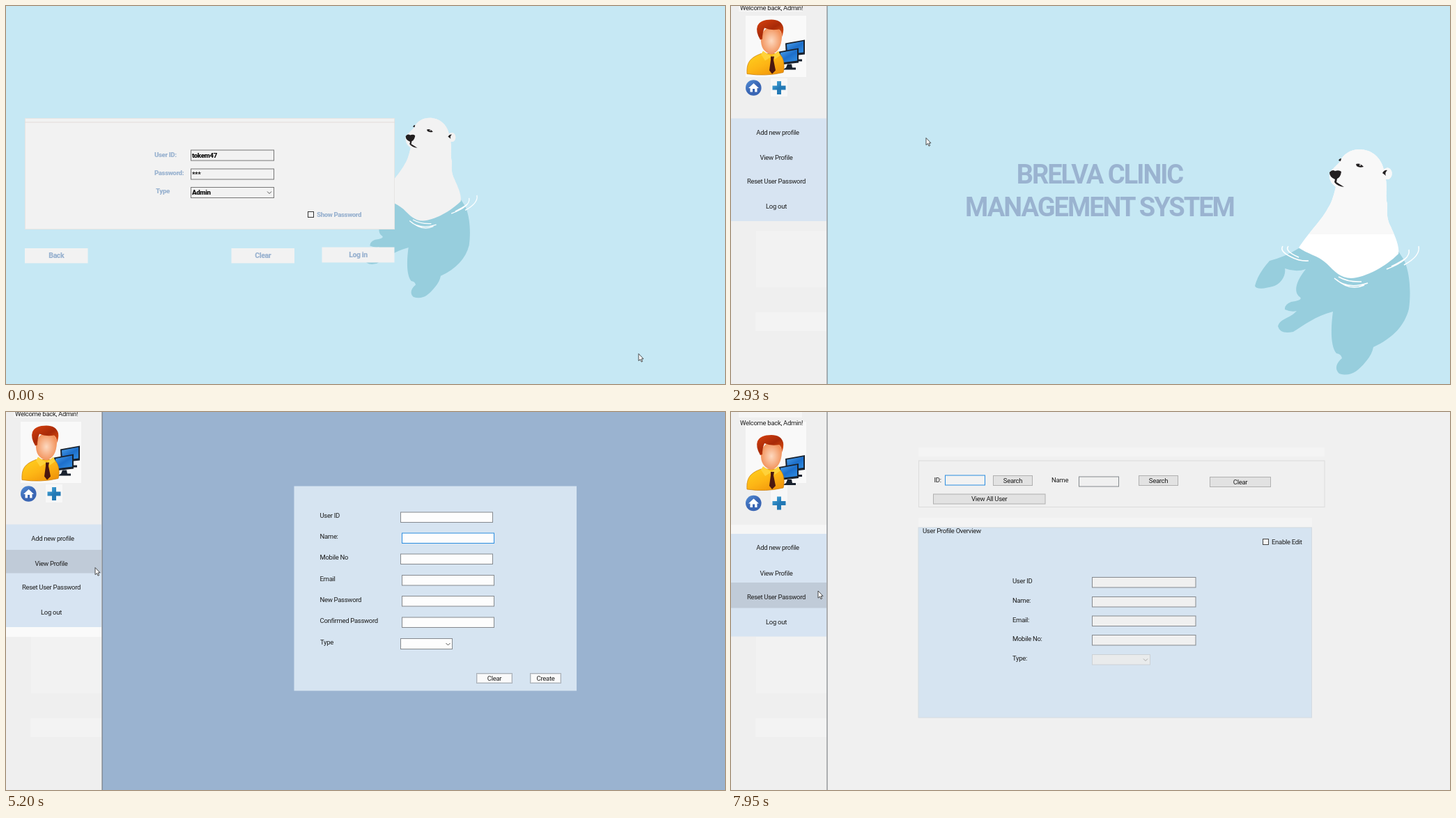
Recreate the animation shown at these times as an HTML page. Size 1032 by 543 pixels, loop 8 s.

```html
<!DOCTYPE html>
<html lang="en">
<head>
<meta charset="utf-8">
<title>Clinic login</title>
<style>
html, body { margin: 0; width: 100%; height: 100%; overflow: hidden; background: #c6e8f4; }
svg { display: block; width: 1032px; height: 543px; }
text { font-family: Roboto, "Open Sans", sans-serif; font-size: 9.5px; letter-spacing: -.3px; fill: #1c1c1c; white-space: pre; }
.b { font-weight: 900; font-size: 9.7px; letter-spacing: -.4px; fill: #9ab3d0; }
.k { fill: #111; }
.btn { font-size: 10.5px; }
.title { font-weight: 700; font-size: 38px; letter-spacing: -2px; fill: #9ab3d0; }
.mid { text-anchor: middle; }
</style>
</head>
<body>
<svg id="stage" viewBox="0 0 1032 543" xmlns="http://www.w3.org/2000/svg"></svg>
<script>
const LOOP = 8000, SHIFT = -13.5;
const BLUE = '#9ab3d0', PALE = '#d6e4f1', GREY = '#f0f0f0', SEA = '#97cedd', SKY = '#c6e8f4';

const rect = (x, y, w, h, fill) => `<rect x="${x}" y="${y}" width="${w}" height="${h}" fill="${fill}"/>`;
const box = (x, y, w, h, fill, line) =>
  `<rect x="${x + .5}" y="${y + .5}" width="${w - 1}" height="${h - 1}" fill="${fill}" stroke="${line}"/>`;
const text = (x, cy, s, cls = '') => `<text x="${x}" y="${cy + 3.4}" class="${cls}">${s}</text>`;
const path = (d, fill, extra = '') => `<path d="${d}" fill="${fill}" ${extra}/>`;
const group = (id, body, extra = '') => `<g id="${id}" ${extra}>${body}</g>`;
const chevron = (x, y, c = '#555') => path(`M${x - 3} ${y - 1.5}l3 3 3 -3`, 'none', `stroke="${c}"`);
const button = (x, y, w, h, label) =>
  box(x, y, w, h, '#e2e2e2', '#b0b0b0') + text(x + w / 2, y + h / 2, label, 'mid');
const framed = (x, y, w, h, label, fill = '#fafafa') =>
  box(x, y, w, h, fill, '#a9b0b8') + box(x + 1, y + 1, w - 2, h - 2, 'none', '#dcdfe2') +
  text(x + w / 2, y + h / 2, label, 'mid');

// Polar bear, split into underwater and dry parts
function bear(top, low) {
  const dry = 'M902 206C889 206 878 213 874 224L860 238Q857 246 862 254L868 260Q863 282 857 290C849 306 832 322 815 347' +
    'C826 356 842 358 855 370C866 381 875 391 890 391C911 390 940 374 958 356C960 343 951 327 947 317C940 304 942 294 942 284' +
    'C939 276 942 262 940 249C947 250 950 243 948 237C945 231 940 232 937 235C933 217 919 206 902 206Z';
  const wet = 'M815 348Q796 360 773 366Q756 385 752 402Q754 409 777 403C789 400 797 387 795 377Q811 383 825 378' +
    'C812 394 807 409 815 417Q824 422 804 425Q794 429 795 436Q804 440 812 438C801 450 789 448 785 460Q788 472 807 468' +
    'C823 458 838 446 864 439C861 461 860 489 869 499Q876 500 877 506C867 514 867 523 873 528C888 533 899 526 911 511' +
    'Q920 501 922 490C950 477 967 459 973 435C976 414 975 384 966 365L957 351L890 380Z';
  const arcs = 'M866 391Q884 408 914 398M869 393Q888 410 909 401M872 389Q886 397 905 396' +
    'M966 372Q990 359 987 345M941 378Q976 365 973 350M948 374Q964 366 970 361' +
    'M792 345Q787 352 803 360Q816 367 829 366M800 345Q794 352 815 361';
  return path(wet, SEA) + path(dry, low) +
    `<g clip-path="url(#upper)">${path(dry, top)}</g>` +
    path(arcs, 'none', 'stroke="#fff" stroke-width="1.5"') +
    path('M859 239Q863 234 867 237Q873 235 876 238Q875 246 870 248L869 253L880 260Q870 259 866 253L867 249Q859 246 859 239Z', '#231f20') +
    path('M872 222Q873 219 876 219L875 223Z', '#231f20') +
    path('M897 227Q903 225 908 231Q902 233 898 230Z', '#231f20') +
    '<circle cx="903" cy="228.6" r="1" fill="#fff"/>' +
    path('M935 240Q938 235 942 236Q938 239 940 244Q938 242 935 240Z', '#231f20');
}

function login() {
  const field = (y, s) => box(265, y, 120, 16, '#f2f2f2', '#777') + text(267, y + 8, s, 'b k');
  const key = (x, y, w, h, label, id) =>
    `<rect id="${id}" x="${x}" y="${y}" width="${w}" height="${h}" fill="#f2f2f2" stroke="none"/>` +
    text(x + w / 2, y + h / 2, label, 'b btn mid');
  return group('swim', bear('#f2f2f2', '#f2f2f2'), 'transform="scale(.79872 .79936) translate(-140.8 -5)"') +
    box(27, 161, 531, 160, '#f2f2f2', '#e6e5e3') + rect(27, 166.5, 531, 1, '#e3dcd9') +
    text(213, 214, 'User ID:', 'b') + text(213, 240, 'Password:', 'b') + text(215, 266, 'Type', 'b') +
    field(206.5, 'tokem47') + field(233.5, '***') + field(260, 'Admin') + chevron(378, 268) +
    box(433, 295, 9, 9, '#f4f4f4', '#333') + text(446, 300, 'Show Password', 'b') +
    key(27, 348, 90.5, 21.5, 'Back', 'back') + key(323.5, 348, 90.5, 21.5, 'Clear', 'wipe') +
    key(453.5, 346.5, 104, 22, 'Log in', 'enter');
}

const dialog = () =>
  box(472, 233, 103, 97, '#fff', '#c9cdd1') + rect(473, 302, 101, 27, GREY) +
  text(482, 270, 'Log in successful') + button(504, 307, 58, 16, 'OK');

const frameLines = () =>
  rect(0, 0, 777, 3, GREY) + rect(0, 3, 777, 1.2, '#c5d3d6') + rect(137.5, 0, 1, 454, '#5d6468') +
  rect(776.5, 0, 1.3, 456, '#f4f4f4') + rect(138, 454.3, 639, 1.3, '#f4f4f4');

const home = () => bear('#f8f8f8', '#fff') +
  `<text x="529" y="254.5" class="title mid">BRELVA CLINIC</text><text x="529" y="301.5" class="title mid">MANAGEMENT SYSTEM</text>`;

const screen = (x, y) => path(`M${x} ${y + 5}L${x + 28} ${y}V${y + 21}L${x + 1} ${y + 24}Z`, '#18212d') +
  path(`M${x + 2} ${y + 6.5}L${x + 26} ${y + 2}V${y + 18}L${x + 3} ${y + 21}Z`, 'url(#glass)') +
  path(`M${x + 12} ${y + 23}h6l1 5h5v3h-19l5 -3z`, '#18212d');

const avatar = () => screen(78, 62) + screen(69, 74) +
  path('M23 111C22 95 27 88 43 82L69 82C77 88 77 101 75 109Q50 115 23 111Z', 'url(#shirt)', 'stroke="#c77a08" stroke-width=".7"') +
  path('M46 78L58 86L68 78L71 84L63 90L57 87L49 92L43 83Z', '#ffd23a') +
  path('M57 86h5l-1 5 3 15 -5 5 -4 -5 2 -15z', '#4a1710') +
  path('M43 60Q42 79 58 83Q72 79 73 58Q72 43 60 44Q46 43 43 60Z', 'url(#skin)') +
  path('M42 62Q35 50 38 42Q42 33 58 33Q72 33 75 44Q76 50 73 58Q73 50 69 47Q57 49 48 45Q45 52 45 61Z', 'url(#hair)');

const rows = [['Add new profile', 67, 175, 36.5, 195], ['View Profile', 65, 211.5, 33.5, 231.5],
  ['Reset User Password', 65, 245, 36.5, 265.5], ['Log out', 65, 281.5, 41, 301.5]];

function menu() {
  return rect(0, 175, 137, 147.5, '#d7e4f2') +
    rows.map((r, i) => `<rect id="row${i}" x="0" y="${r[2]}" width="137" height="${r[3]}" fill="#c0cbd8"/>` +
      text(r[1], r[4], r[0], 'mid')).join('') +
    text(13, 16, 'Welcome back, Admin!') + avatar() +
    '<circle cx="32.3" cy="131" r="11.3" fill="url(#disc)"/>' +
    path('M25 131.5L32.5 124.5L40 131.5H37.5V137H34.2V132.5H31V137H27.5V131.5Z', '#fff') +
    path('M66 121.5h6v6.5h6.5v6h-6.5v6.5h-6v-6.5h-6.5v-6h6.5z', 'url(#cross)');
}

const plates = () => rect(36, 323, 101, 81, '#f2f2f2') + rect(35, 440, 102, 27, '#f3f3f3') +
  rect(21, 14, 87, 88, '#f9f9f9') + rect(57, 104, 24, 26, '#f7f7f7') + rect(11, 0, 91, 8, '#f5f5f5');

function form() {
  const fields = [['User ID', 566, 162, 157], ['Name:', 568, 192, 187], ['Mobile No', 566, 222.5, 217], ['Email', 568, 253, 247.5],
    ['New Password', 568, 283, 277.5], ['Confirmed Password', 568, 313, 308]];
  return fields.map(([s, x, cy, y], i) =>
    text(450.5, cy, s) + box(x, y, 133, 15.5, '#fdfdfd', i == 1 ? '#2b8de0' : '#85898e')).join('') +
    text(451, 344.5, 'Type') + box(566, 338.5, 75, 16, '#fdfdfd', '#85898e') + chevron(634.5, 347) +
    framed(675, 388.5, 52, 15, 'Clear') + framed(752, 388.5, 45, 15, 'Create');
}
const sheet = () => rect(413.5, 120, 405.5, 294, PALE);
const slots = [237, 265, 292.5, 320];

// Half-painted profile window over the closing form
const half = () => rect(269, 64.5, 583, 73, BLUE) + rect(269, 165.5, 565, 274, BLUE) +
  `<g clip-path="url(#holes)">${sheet()}${form()}</g>` +
  framed(307, 90.5, 58, 15, '', '#fff') + framed(499, 92.5, 58, 15, '', BLUE) +
  slots.map(y => box(518, y, 149.5, 15.5, 'none', '#8a9097')).join('');

const profile = () => rect(269, 51, 583, 13, '#f4f4f4') + rect(269, 152, 565, 13, '#f4f4f4') +
  box(269, 69.5, 583.5, 67.5, 'none', '#dcdcdc') +
  text(291.5, 98, 'ID:') + box(307, 90.5, 58, 15, '#f2f2f2', '#2b8de0') + button(376, 91, 57, 15, 'Search') +
  text(460, 98, 'Name') + box(499, 92.5, 58, 15, GREY, '#85898e') + button(585, 91, 57, 15, 'Search') +
  button(687, 93, 88, 15, 'Clear') + button(290, 117.5, 161.5, 15, 'View All User') +
  box(268.5, 165.5, 565.5, 274, PALE, '#d4dbe2') + text(275, 171, 'User Profile Overview') +
  box(763, 182, 9, 9, '#f4f4f4', '#444') + text(776, 187, 'Enable Edit') +
  ['User ID', 'Name:', 'Email:', 'Mobile No:'].map((s, i) =>
    text(404, slots[i] + 6, s) + box(518, slots[i], 149.5, 15.5, GREY, '#85898e')).join('') +
  text(404, 354, 'Type:') + box(518, 348, 84, 15.5, '#e9ebec', '#ccd1d5') + chevron(595, 356, '#aaa');

const grad = (id, a, b, c = b) => `<linearGradient id="${id}" x1="0" y1="0" x2=".8" y2="1"><stop stop-color="${a}"/>` +
  `<stop offset=".55" stop-color="${b}"/><stop offset="1" stop-color="${c}"/></linearGradient>`;

const svg = document.getElementById('stage');
svg.innerHTML = '<defs>' + grad('shirt', '#ffd21f', '#fdb515', '#f0930a') + grad('hair', '#d8420f', '#a82a08', '#e2530f') +
  grad('glass', '#4fa3ea', '#1d6fcb', '#2f8be0') + grad('disc', '#5490d8', '#3a66b4') + grad('cross', '#4fb0e0', '#2379b5') +
  '<radialGradient id="skin"><stop stop-color="#fdd9c0"/><stop offset="1" stop-color="#f2935c"/></radialGradient>' +
  `<clipPath id="upper">${rect(700, 0, 332, 328)}</clipPath>` +
  `<clipPath id="holes">${rect(269, 64.5, 583, 73)}${rect(269, 165.5, 565, 274)}</clipPath></defs>` +
  '<rect id="bg" width="1032" height="543"/>' +
  group('login', login()) + group('dialog', dialog()) + group('lines', frameLines()) + group('home', home()) +
  group('sheet', sheet()) + group('form', form()) + group('half', half()) + group('profile', profile()) +
  group('side', rect(0, 0, 138, 543, '#efefef') + plates() +
    group('band', rect(0, 162, 137, 13, '#f6f6f6')) + group('gap', rect(0, 309, 137, 14, '#fafafa')) +
    group('menu', menu()) + rect(137.5, 0, 1, 543, '#6a6e72')) +
  group('caret', rect(0, 0, 1, 12, '#222')) +
  group('arrow', path('M0 0V10.2L2.4 8 4 11.7 5.6 11 4 7.4H7Z', '#fff', 'stroke="#222" stroke-width=".8"')) +
  group('hand', path('M-1 1Q0 -.6 1 1V5L5.4 6Q6.5 6.5 6.3 8L5.4 12.3H.2L-2.8 8.4Q-3.2 6.6 -1 7.4Z', '#fff', 'stroke="#222" stroke-width=".9"'));

const $ = {};
svg.querySelectorAll('[id]').forEach(e => $[e.id] = e);
const show = (id, on) => $[id].style.display = on ? '' : 'none';
const move = (id, x, y) => $[id].setAttribute('transform', `translate(${x} ${y})`);
const within = (t, a, b) => t >= a && t < b;

// Pointer legs: begin, end, steps, destination
const legs = [[70, 610, 8, 509, 352], [1230, 1690, 6, 523, 306], [2690, 2930, 4, 280, 189.5],
  [3020, 3400, 6, 118, 188], [4570, 4880, 5, 128, 223.5], [6360, 6760, 6, 126, 258], [7950, 7950, 1, 125, 257]];

function pointer(t) {
  let x = 908, y = 499.5;
  for (const [a, b, n, tx, ty] of legs) {
    if (t < a) break;
    const k = t >= b ? 1 : Math.floor((t - a) / (b - a) * (n - 1) + 1) / n;
    const e = k * k * (3 - 2 * k);
    x += (tx - x) * e;
    y += (ty - y) * e;
  }
  return [x, y];
}

function draw(t) {
  const [x, y] = pointer(t);
  const hand = within(t, 533, 1150) || within(t, 2000, 2270);
  show('hand', hand);
  show('arrow', !hand);
  move(hand ? 'hand' : 'arrow', x, hand ? y + 1.5 : y);

  show('login', t < 2210);
  $.login.setAttribute('transform', t < 2150 ? '' : 'translate(.8 5) scale(1.252 1.251)');
  $.enter.setAttribute('fill', within(t, 533, 1080) ? '#d5d5d5' : '#f2f2f2');
  $.enter.setAttribute('stroke', t >= 920 ? '#a3b9d4' : 'none');
  show('dialog', within(t, 1080, 2000));
  show('lines', within(t, 2150, 2210));

  const up = within(t, 2210, 3720) || within(t, 5050, 5520);
  const dy = up ? SHIFT : 0;
  $.bg.setAttribute('fill', t < 3560 ? SKY : t < 5440 ? BLUE : GREY);
  show('side', t >= 2210);
  show('menu', t >= 2270);
  show('band', !up);
  show('gap', within(t, 5050, 5520));
  show('home', within(t, 2330, 3560));
  show('sheet', within(t, 3870, 5440));
  show('form', within(t, 3960, 5440));
  show('half', within(t, 5440, 5900));
  show('profile', t >= 5900);
  for (const id of ['menu', 'sheet', 'form', 'half']) move(id, 0, dy);
  rows.forEach((r, i) => show('row' + i, x < 137 && within(y - dy, r[2], r[2] + r[3])));

  const nameCaret = within(t, 3960, 4500);
  show('caret', nameCaret || within(t, 5900, 6430) || within(t, 7000, 7540));
  move('caret', nameCaret ? 570 : 309, nameCaret ? 188.5 : 92);
}

const start = performance.now();
function tick() {
  draw((performance.now() - start) % LOOP);
  requestAnimationFrame(tick);
}
tick();
</script>
</body>
</html>
```
